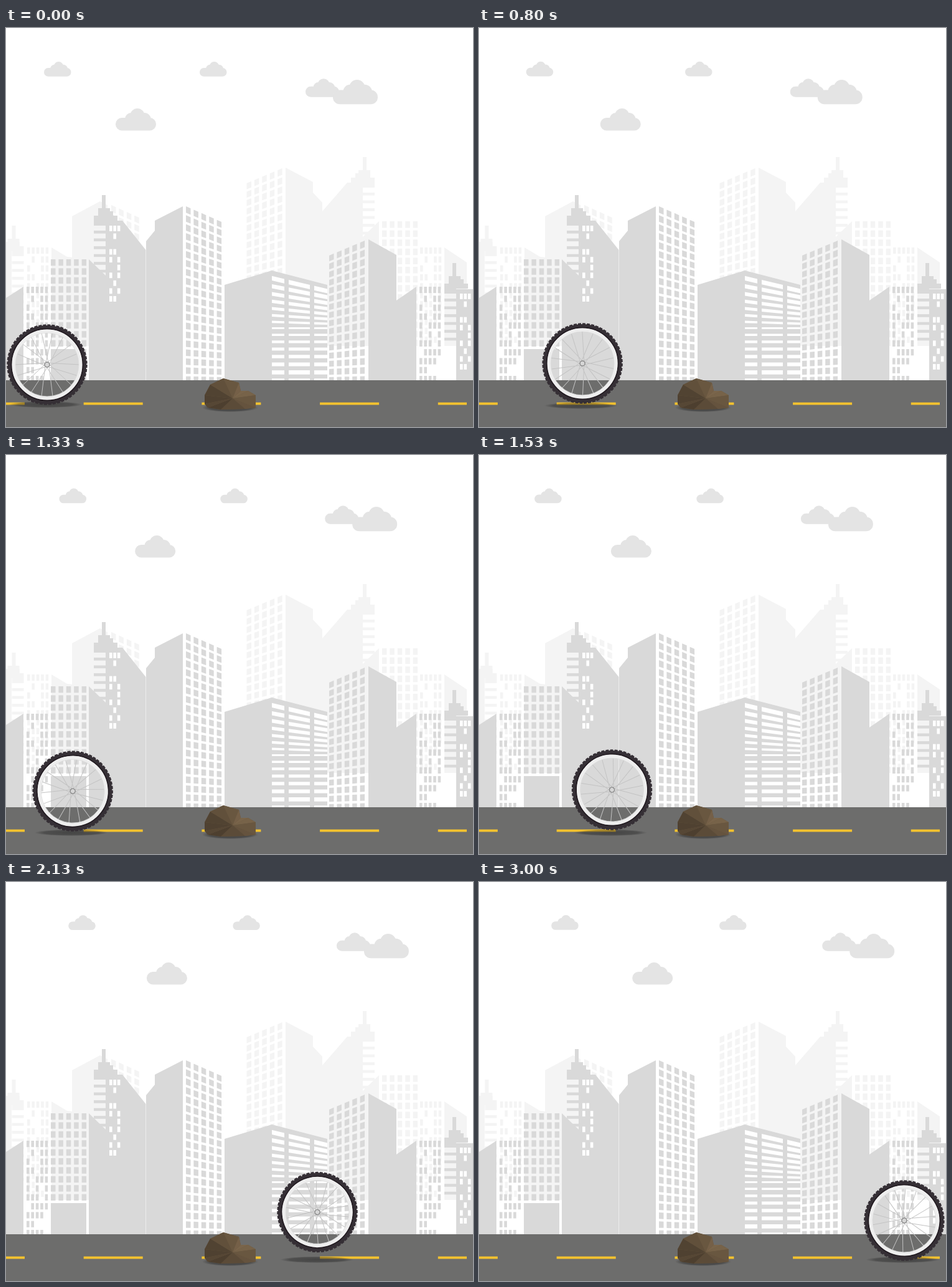
Animation of 750 by 640 pixels, one loop 3070 ms. Source, as an HTML page with a canvas:

```html
<!DOCTYPE html>
<html lang="en">
<head>
<meta charset="utf-8">
<title>Wheel and rock</title>
<style>
html, body { margin: 0; width: 100%; height: 100%; overflow: hidden; background: #fff; }
canvas { display: block; }
</style>
</head>
<body>
<canvas id="stage" width="750" height="640"></canvas>
<script>
const g = document.getElementById('stage').getContext('2d');
const TAU = Math.PI * 2, LOOP = 3070, STEP = 1000 / 15;
const PALE = '#f4f4f4', GREY = '#d9d9d9', CLOUD = '#e4e4e4', TYRE = '#352f35';
const ROAD = 565, FLOOR = 14.3;

// Repeatable noise from 0 to 1
const noise = (a, b) => Math.abs(Math.sin(a * 12.99 + b * 78.23) * 43758.5) % 1;

function rect(c, color, x, y, w, h) {
  c.fillStyle = color;
  c.fillRect(x, y, w, h);
}

function poly(c, color, ...p) {
  c.fillStyle = color;
  c.beginPath();
  for (let i = 0; i < p.length; i += 2) c.lineTo(p[i], p[i + 1]);
  c.fill();
}

// Solid wall: the given outline, closed straight down to the road
function wall(c, color, ...top) {
  poly(c, color, ...top, top[top.length - 2], ROAD, top[0], ROAD);
}

// Windows whose rows level out towards the road
function grid(c, color, x, left, right, cols = 5, bottom = 573) {
  const pitch = 12.4, w = 7.5, span = (cols - 1) * pitch + w;
  const rows = Math.round((bottom - Math.min(left, right)) / FLOOR);
  const at = (px, row) => {
    const top = left + (right - left) * (px - x) / span;
    return top + (bottom - top) * row / rows;
  };
  for (let r = 0; r < rows; r++) {
    for (let i = 0; i < cols; i++) {
      const a = x + i * pitch, b = a + w;
      poly(c, color, a, at(a, r), b, at(b, r), b, at(b, r + .72), a, at(a, r + .72));
    }
  }
}

// Narrow windows, some of them missing
function slots(c, color, x, y, cols, pitchX, pitchY, bottom, share) {
  for (let r = 0; y + r * pitchY < bottom; r++)
    for (let i = 0; i < cols; i++)
      if (noise(r, i) < share) rect(c, color, x + i * pitchX, y + r * pitchY, 4.6, pitchY * .71);
}

// Stepped tower with a banded half; dir -1 mirrors it around mid
function tower(c, color, mid, y, dir, bands) {
  const bar = (a, b, top, h) => rect(c, color, mid + (dir > 0 ? a : -b), y + top, b - a, h);
  bar(-6, 0, 0, 26);
  bar(-12, 7, 21, 12);
  bar(-12, 12, 26, 7);
  bar(-19, 19, 33, 8);
  bar(-19, 0, 41, 8);
  for (let i = 0; i < bands; i++) bar(-19, 0, 57 + i * 12.55, 4.6);
}

function farCity(c) {
  tower(c, PALE, 9.5, 317, -1, 9);
  wall(c, PALE, 0, 350, 9, 350);
  slots(c, PALE, 34, 352, 5, 7.4, FLOOR, ROAD, .75);
  wall(c, PALE, 73, 352, 98, 367, 133, 371);
  wall(c, PALE, 106, 302, 151, 278, 163, 284);
  grid(c, PALE, 169, 284, 304, 4);
  grid(c, PALE, 386.5, 249, 225);
  wall(c, PALE, 449, 224, 493, 247, 493, 264, 508, 280, 508, 294, 548, 248, 573, 248,
    573, 335, 599, 310);
  tower(c, PALE, 573, 207, -1, 7);
  grid(c, PALE, 604, 310, 310);
  slots(c, PALE, 665, 352, 5, 7.4, FLOOR, ROAD, .75);
  wall(c, PALE, 704, 352, 740, 376);
}

// White strips that flatten and thin out at eye level
function strips(c, x, eye) {
  for (let i = -7; i <= 7; i++) {
    const y = eye + 10.2 * i + .22 * i * Math.abs(i);
    const h = 3 + Math.abs(i) * .6, slope = Math.max(0, -i) * .033;
    for (const [from, to] of [[0, 20], [27, 61], [68, 89]])
      poly(c, '#fff', x + from, y + from * slope, x + to, y + to * slope,
        x + to, y + to * slope + h, x + from, y + from * slope + h);
  }
}

function nearCity(c) {
  wall(c, GREY, 0, 433, 28, 415);
  slots(c, GREY, 33, 415, 5, 7.4, FLOOR, ROAD, .75);
  tower(c, GREY, 160, 268, 1, 7);
  wall(c, GREY, 160, 309, 187, 309);
  slots(c, '#fff', 166, 317, 3, 6.4, 12.55, 435, .6);
  grid(c, GREY, 72, 371, 371, 5, 515);
  rect(c, GREY, 72, 515, 57, 50);
  wall(c, GREY, 133, 371, 160, 397);
  wall(c, GREY, 187, 309, 224.5, 356);
  wall(c, GREY, 225, 342, 239, 325, 239, 309, 284, 286);
  grid(c, GREY, 289, 286, 311);
  wall(c, GREY, 351, 412, 427, 389, 516, 412);
  strips(c, 427, 480);
  grid(c, GREY, 519, 365, 341);
  wall(c, GREY, 582, 339, 627, 364);
  wall(c, GREY, 627, 437, 659, 415);
  slots(c, GREY, 664, 415, 5, 7.4, FLOOR, ROAD, .75);
  tower(c, GREY, 723, 377, 1, 6);
  wall(c, GREY, 723, 419, 750, 419);
  slots(c, '#fff', 729, 426, 3, 6.4, 12.55, 545, .6);
}

function drawRoad(c) {
  rect(c, '#6d6d6c', 0, ROAD, 750, 75);
  for (let x = -65; x < 740; x += 189.7)
    rect(c, '#f4c22f', x, 600.6, Math.min(95, 740 - x), 3.9);
}

function layer(...parts) {
  const cv = document.createElement('canvas');
  cv.width = 750;
  cv.height = 640;
  parts.forEach(part => part(cv.getContext('2d')));
  return cv;
}

const far = layer(farCity);
const scene = layer(c => c.drawImage(far, 0, 0, 750, 510, 0, 0, 750, 510), nearCity, drawRoad);

function cloud(x, y, w) {
  g.save();
  g.translate(x, y);
  g.scale(w / 65, w / 65);
  g.fillStyle = CLOUD;
  g.beginPath();
  g.roundRect(0, 15, 65, 20.5, 10);
  for (const [cx, cy, r] of [[25, 17, 10], [35, 11.5, 11.5], [46, 18, 11]]) {
    g.moveTo(cx + r, cy);
    g.arc(cx, cy, r, 0, TAU);
  }
  g.fill();
  g.restore();
}

function softOval(x, y, rx, ry, alpha) {
  g.save();
  g.translate(x, y);
  g.scale(rx, ry);
  const fade = g.createRadialGradient(0, 0, 0, 0, 0, 1);
  fade.addColorStop(0, `rgba(35,35,35,${alpha})`);
  fade.addColorStop(.75, `rgba(35,35,35,${alpha * .75})`);
  fade.addColorStop(1, 'rgba(35,35,35,0)');
  g.fillStyle = fade;
  g.beginPath();
  g.arc(0, 0, 1, 0, TAU);
  g.fill();
  g.restore();
}

// Facets fan out from one inner point, lighter towards the upper right
function rock() {
  const edge = [[319, 603], [319, 589], [328, 572], [349, 562], [374, 569], [377, 582],
    [389, 582], [401, 589], [401, 609], [384, 611], [345, 612], [324, 609]];
  softOval(360, 609, 45, 7, .6);
  poly(g, '#68563f', ...edge.flat());
  edge.forEach(([x, y], i) => {
    const [nx, ny] = edge[(i + 1) % edge.length];
    const angle = Math.atan2((y + ny) / 2 - 594, (x + nx) / 2 - 364);
    const light = 31 + 6 * Math.cos(angle + .7) + 5 * (noise(i, 3) - .5);
    poly(g, `hsl(33 24% ${light}%)`, x, y, nx, ny, 364, 594);
  });
}

function ring(r, width, color) {
  g.lineWidth = width;
  g.strokeStyle = color;
  g.beginPath();
  g.arc(0, 0, r, 0, TAU);
  g.stroke();
}

function wheel(x, y) {
  g.save();
  g.translate(x, y);
  g.rotate((x - 66) / 64);
  g.lineWidth = 1;
  g.strokeStyle = '#c3c3c3';
  g.beginPath();
  for (let i = 0; i < 18; i++) {
    const a = i * TAU / 18, b = a + (i % 2 ? .7 : -.7);
    g.moveTo(4 * Math.cos(b), 4 * Math.sin(b));
    g.lineTo(52 * Math.cos(a), 52 * Math.sin(a));
  }
  g.stroke();
  const knob = TAU * 63 / 56;
  g.setLineDash([knob * .7, knob * .3]);
  ring(63, 3.4, TYRE);
  g.setLineDash([]);
  ring(59.8, 6.6, TYRE);
  ring(57.3, 1.8, '#211a20');
  ring(53.7, 5.6, '#eeeeee');
  ring(51, .8, '#dddddd');
  g.fillStyle = '#d6d6d6';
  g.beginPath();
  g.arc(0, 0, 4, 0, TAU);
  g.fill();
  ring(4, 1.5, '#8c8c8c');
  g.restore();
}

// Run up, bounce off, run again, leap, then roll away
function wheelAt(n) {
  const run = k => [66 + 200 * k, 540 - 4 * k];
  if (n < 11) return run((n / 11) ** 4.3);
  if (n < 16) return run(((16 - n) / 5) ** 3.1);
  if (n < 24) return run(((n - 16) / 8) ** 2.28);
  if (n < 27) {
    const k = (n - 24) / 3;
    return [266 + 163 * k, 536 - 81.5 * Math.sin(k * Math.PI / 2)];
  }
  const u = n - 27;
  return [429 + 14.25 * u - .008 * u * u, Math.min(543, 454.5 + 3 * u * u)];
}

function draw(n) {
  const s = n / 15;
  g.clearRect(0, 0, 750, 640);
  g.drawImage(scene, 0, 0);
  cloud(61 + 18.4 * s, 54 - .3 * s, 43.5);
  cloud(311 + 25 * s, 54 - .3 * s, 43.5);
  cloud(176 + 23.4 * s, 129, 65);
  cloud(481 + 23.4 * s, 81.3, 54);
  cloud(525 + 23.4 * s, 83, 72);
  const [x, y] = wheelAt(n);
  const lift = Math.max(0, 536 - y);
  softOval(x - 2.5 + lift * .26, 604 + Math.min(1.8, n * .15), 59, 5.2, .55);
  rock();
  wheel(x, y);
}

const start = performance.now();
function tick() {
  const t = (performance.now() - start) % LOOP;
  draw(Math.min(45, Math.floor((t + 5) / STEP)));
  requestAnimationFrame(tick);
}
tick();
</script>
</body>
</html>
```
